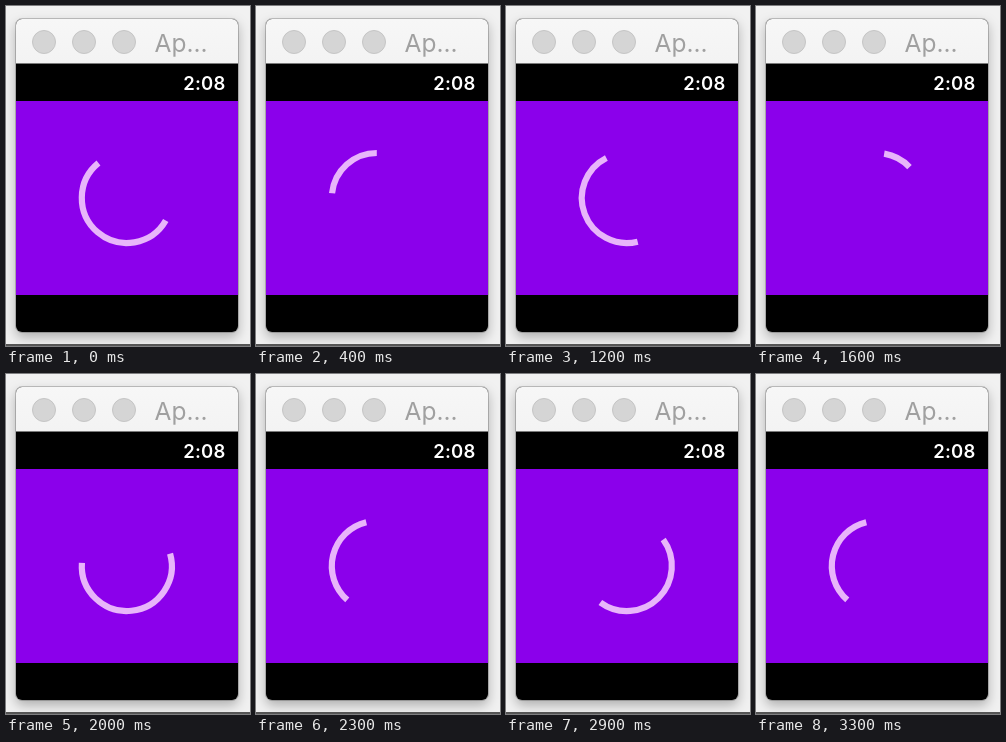
Recreate the animation shown at these times as an HTML page. Size 244 px wide and 340 px high, loop 3400 ms.

```html
<!DOCTYPE html>
<html lang="en">
<head>
<meta charset="utf-8">
<title>Watch spinner</title>
<style>
  html, body { margin: 0; width: 100%; height: 100%; overflow: hidden; background: #f1f1f1; }
  svg { display: block; width: 244px; height: 340px; }
  text { font-family: Inter, "Liberation Sans", sans-serif; }
  .window { filter: drop-shadow(0 5px 6px rgba(0, 0, 0, .28)); }
  .lights circle { fill: #d5d5d5; stroke: #c5c5c5; }
  .title { font-size: 24.5px; fill: #a0a0a0; }
  .clock { font-size: 18.5px; font-weight: 600; letter-spacing: .2px; fill: #fff; }
</style>
</head>
<body>
<svg viewBox="0 0 244 340">
  <defs>
    <clipPath id="frame"><rect x="10" y="13" width="222" height="313" rx="6"/></clipPath>
    <linearGradient id="bar" x2="0" y2="1">
      <stop stop-color="#f7f7f7"/>
      <stop offset="1" stop-color="#f3f3f3"/>
    </linearGradient>
  </defs>
  <rect width="244" height="340" fill="#f1f1f1"/>
  <g class="window">
    <g clip-path="url(#frame)">
      <rect x="10" y="13" width="222" height="313"/>
      <rect x="10" y="13" width="222" height="44.5" fill="url(#bar)"/>
      <rect x="10" y="95" width="222" height="194" fill="#8b00eb"/>
    </g>
    <rect x="9.5" y="12.5" width="223" height="314" rx="6.5" fill="none" stroke="#000" stroke-opacity=".2"/>
  </g>
  <g class="lights">
    <circle cx="38" cy="36" r="11.5"/>
    <circle cx="78" cy="36" r="11.5"/>
    <circle cx="118" cy="36" r="11.5"/>
  </g>
  <text class="title" x="148.5" y="46">Ap...</text>
  <text class="clock" x="219.5" y="84" text-anchor="end">2:08</text>
  <path id="arc" fill="none" stroke="#e8b5fa" stroke-width="6.2"/>
  <rect y="338" width="244" height="2" fill="#555"/>
</svg>
<script>
  const LOOP = 3400, STEP = 100, TURN = 10;
  const CX = 120.8, CY = 192, R = 45;

  // [phase in steps, angle in degrees] over one turn
  const tail = [[1.2, 30], [2, 76], [4, 186], [5.5, 272], [9, 324], [10, 344], [10.6, 359], [11.2, 390]];
  const head = [[1.2, 231], [2, 243], [4, 270], [5.6, 294], [9, 486], [10, 544], [10.65, 581], [11.2, 591]];

  function angleAt(keys, phase) {
    const i = keys.findIndex(key => key[0] >= phase) || 1;
    const [p0, a0] = keys[i - 1], [p1, a1] = keys[i];
    return a0 + (a1 - a0) * (phase - p0) / (p1 - p0);
  }

  function point(deg) {
    const a = deg * Math.PI / 180;
    return `${(CX + R * Math.cos(a)).toFixed(2)} ${(CY + R * Math.sin(a)).toFixed(2)}`;
  }

  const arc = document.getElementById("arc");
  const begin = performance.now();

  function draw(now) {
    const step = Math.floor(Math.max(0, now - begin) % LOOP / STEP);
    // the first pose is held for two steps
    let phase = step < 2 ? 1.2 : step % TURN;
    if (phase < 1.2) phase += TURN;
    const from = angleAt(tail, phase), to = angleAt(head, phase);
    const large = to - from > 180 ? 1 : 0;
    arc.setAttribute("d", `M${point(from)}A${R} ${R} 0 ${large} 1 ${point(to)}`);
    requestAnimationFrame(draw);
  }
  draw(begin);
</script>
</body>
</html>
```
